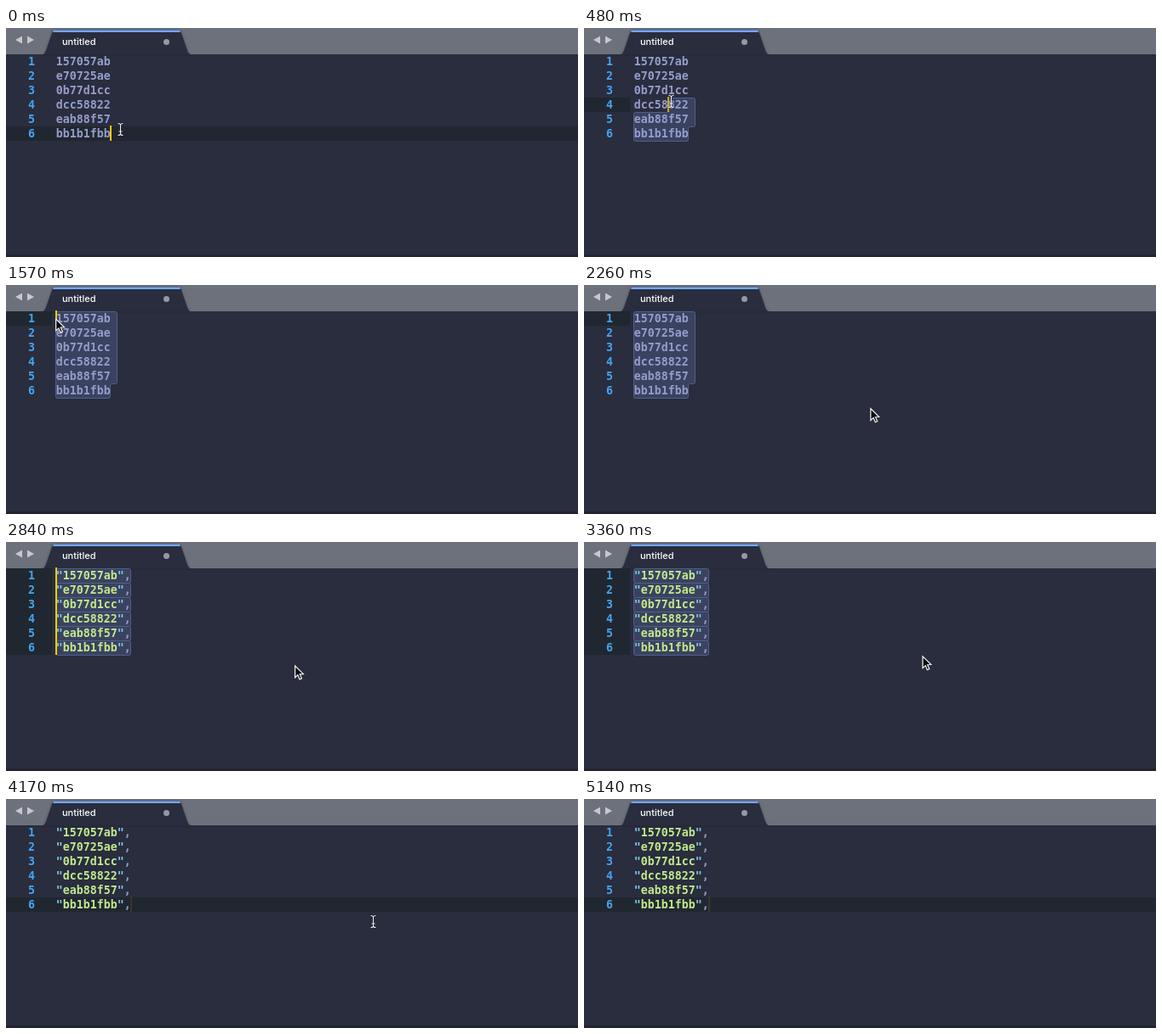
Recreate the animation shown at these times as an HTML page with a canvas. Size 672 px wide and 270 px high, loop 5.54 s.

```html
<!DOCTYPE html>
<html lang="en">
<head>
<meta charset="utf-8">
<title>Editor</title>
<style>
  html, body { margin: 0; width: 100%; height: 100%; overflow: hidden; background: #292d3e; }
  canvas { display: block; width: 672px; height: 270px; }
</style>
</head>
<body>
<canvas id="stage" width="672" height="270"></canvas>
<script>
const ctx = document.getElementById('stage').getContext('2d');
const W = 672, H = 270, LOOP = 5540;
const TOP = 31, ROW = 17, LEFT = 58, CHAR = 8;
const MONO = 'bold 13.29px "DejaVu Sans Mono", monospace';
const UI = '500 11px Inter, sans-serif';
const LINES = ['157057ab', 'e70725ae', '0b77d1cc', 'dcc58822', 'eab88f57', 'bb1b1fbb'];
const LAST = LINES.length - 1;

// Moments of the story, in ms
const GRAB = 60, DROP = 1280, HOVER = 1440, QUOTE = 2420, CLICK = 3560;

const clamp = (v, a = 0, b = 1) => Math.min(b, Math.max(a, v));
const easeOut = u => 1 - (1 - u) ** 2;
const easeBoth = u => u * u * (3 - 2 * u);

// Pointer strokes: start, end, target x and y, easing
const HOME = [134, 119];
const STROKES = [
  [164, 1500, 54, 38, easeOut],
  [1535, 1990, 367, 145, easeBoth],
  [2000, 2260, 336, 145, easeBoth],
  [2800, 3110, 429, 150, easeBoth],
  [3110, 3360, 397, 134, easeBoth],
  [3500, 3620, 403, 144, easeBoth],
  [3970, 4155, 431, 144, easeBoth],
  [4160, 4290, 430, 157, easeBoth],
  [4420, 4960, 650, 290, easeBoth]
];

// The screen refreshes on a fixed beat
function snap(t) {
  const beat = 57.6, phase = 240;
  return Math.max(0, phase + beat * Math.floor((t - phase) / beat + .15));
}

function pointer(t) {
  let [x, y] = HOME;
  for (const [a, b, tx, ty, ease] of STROKES) {
    const f = ease(clamp((t - a) / (b - a)));
    x += (tx - x) * f;
    y += (ty - y) * f;
  }
  return [x, y];
}

// The caret blinks once a second, restarting with each action
function blink(t) {
  const age = t - [CLICK, QUOTE, DROP, 0].find(start => t >= start);
  const m = age % 1000, fade = 140;
  const rise = age < 1000 ? 1 : clamp(m / fade);
  return Math.min(rise, clamp((570 - m) / fade));
}

function rect(color, x, y, w, h) {
  ctx.fillStyle = color;
  ctx.fillRect(x, y, w, h);
}

function poly(points, color) {
  ctx.beginPath();
  points.forEach(([x, y]) => ctx.lineTo(x, y));
  ctx.closePath();
  ctx.fillStyle = color;
  ctx.fill();
}

function text(str, x, y, color, font = MONO) {
  ctx.font = font;
  ctx.fillStyle = color;
  ctx.fillText(str, x, y);
}

const rowY = row => TOP + row * ROW;
const colX = col => LEFT + col * CHAR;

function drawTabBar() {
  const mid = 130, half = 86.5;
  rect('#6d717b', 0, 0, W, TOP);
  ctx.save();
  ctx.shadowColor = 'rgba(20,24,34,.4)';
  ctx.shadowBlur = 3;
  ctx.beginPath();
  ctx.moveTo(mid - half, TOP);
  ctx.quadraticCurveTo(46, 30, 47.5, 25);
  ctx.lineTo(54, 6);
  ctx.quadraticCurveTo(55, 2.5, 58, 2.5);
  ctx.lineTo(202, 2.5);
  ctx.quadraticCurveTo(205, 2.5, 206, 6);
  ctx.lineTo(212.5, 25);
  ctx.quadraticCurveTo(214, 30, mid + half, TOP);
  ctx.closePath();
  ctx.fillStyle = '#292d3e';
  ctx.fill();
  ctx.restore();
  poly([[56, 2.5], [204, 2.5], [205, 5], [55, 5]], '#72a5f8');
  for (const [tip, back] of [[11, 19], [33, 25]]) {
    poly([[tip, 14], [back, 9.5], [back, 18.5]], '#c6c8cc');
  }
  text('untitled', 66, 20, '#ffffff', UI);
  ctx.beginPath();
  ctx.arc(188.5, 16.5, 3.5, 0, 7);
  ctx.fillStyle = '#9699a4';
  ctx.fill();
}

function roundPath(points, r = 2) {
  const n = points.length, [ax, ay] = points[n - 1], [bx, by] = points[0];
  ctx.beginPath();
  ctx.moveTo((ax + bx) / 2, (ay + by) / 2);
  points.forEach(([x, y], i) => ctx.arcTo(x, y, ...points[(i + 1) % n], r));
  ctx.closePath();
  ctx.fillStyle = '#3a4260';
  ctx.fill();
  ctx.strokeStyle = '#535e88';
  ctx.lineWidth = 1;
  ctx.stroke();
}

const roundBox = (l, t, r, b) => roundPath([[l, t], [r, t], [r, b], [l, b]]);

function drawSelection(row, col) {
  const l = LEFT + .5, end = colX(8) + .5, r = end + CHAR;
  const x = colX(col) + .5, y = rowY(row) + .5;
  const low = rowY(LAST) + .5, base = low + ROW;
  if (row === LAST - 1 && x >= end) {
    roundBox(x, y, r, low);
    roundBox(l, low, end, base);
    return;
  }
  const pts = [[x, y], [r, y], [r, low], [end, low], [end, base], [l, base]];
  if (col) pts.push([l, y + ROW], [x, y + ROW]);
  roundPath(pts);
}

function drawCaret(row, col, alpha) {
  ctx.globalAlpha = alpha;
  rect('#ffcc00', colX(col), rowY(row) - 1, 2, ROW + 1);
  ctx.globalAlpha = 1;
}

function drawCode(quoted) {
  LINES.forEach((line, i) => {
    const y = rowY(i) + 13;
    const put = (s, col, color) => text(s, colX(col) + .7, y, color);
    text(i + 1, 25.9, y, '#42a5f5');
    if (!quoted) return put(line, 0, '#959dcb');
    put('"', 0, '#80cbe8');
    put(line, 1, '#c3e88d');
    put('"', 9, '#80cbe8');
    put(',', 10, '#959dcb');
  });
}

function drawArrow(x, y) {
  ctx.save();
  ctx.translate(x, y);
  ctx.beginPath();
  [[.8, .8], [.8, 14.6], [4, 11.6], [6.2, 16.7], [8.6, 15.7], [6.4, 10.7], [10.6, 10.5]]
    .forEach(([a, b]) => ctx.lineTo(a, b));
  ctx.closePath();
  ctx.fillStyle = '#08090c';
  ctx.fill();
  ctx.strokeStyle = '#f4f4f6';
  ctx.lineWidth = 1.2;
  ctx.stroke();
  ctx.restore();
}

function drawBeam(x, y) {
  ctx.save();
  ctx.translate(Math.round(x) + .5, Math.round(y) + .5);
  ctx.beginPath();
  for (const s of [-1, 1]) {
    ctx.moveTo(-3, s * 7);
    ctx.quadraticCurveTo(0, s * 7, 0, s * 5);
    ctx.quadraticCurveTo(0, s * 7, 3, s * 7);
  }
  ctx.moveTo(0, -5.5);
  ctx.lineTo(0, 5.5);
  ctx.moveTo(-2, 2.5);
  ctx.lineTo(2, 2.5);
  for (const [color, width] of [['rgba(15,18,26,.55)', 2.6], ['#eeeff2', 1.1]]) {
    ctx.strokeStyle = color;
    ctx.lineWidth = width;
    ctx.stroke();
  }
  ctx.restore();
}

function draw(time) {
  const t = snap(time);
  const [x, y] = pointer(t);
  const quoted = t >= QUOTE, clicked = t >= CLICK;
  const active = '#212730', gutter = 54;
  let alpha = blink(t), row = LAST, col = 8;

  rect('#292d3e', 0, 0, W, H);
  drawTabBar();

  if (t < GRAB || clicked) {
    if (clicked) {
      col = 11;
      alpha = Math.max(.1, alpha);
    }
    rect(active, 0, rowY(row), W, ROW);
  } else if (quoted) {
    rect(active, 0, TOP, gutter, ROW * LINES.length);
    LINES.forEach((_, i) =>
      roundBox(LEFT + .5, rowY(i) + .5, colX(11) + .5, rowY(i + 1) + .5));
  } else {
    // The selection follows the pointer until the button is released
    const [dx, dy] = pointer(Math.min(t, DROP));
    row = clamp(Math.floor((dy - TOP) / ROW), 0, LAST - 1);
    col = clamp(Math.round((dx - LEFT) / CHAR), 0, 8);
    rect(active, 0, rowY(row), gutter, ROW);
    drawSelection(row, col);
  }

  drawCode(quoted);
  if (quoted && !clicked) LINES.forEach((_, i) => drawCaret(i, 0, alpha));
  else drawCaret(row, col, alpha);

  rect('#222431', 0, 267, W, 3);
  if (t >= HOVER && !clicked) drawArrow(x, y);
  else drawBeam(x, y);
}

function tick() {
  draw(performance.now() % LOOP);
  requestAnimationFrame(tick);
}
tick();
</script>
</body>
</html>
```
